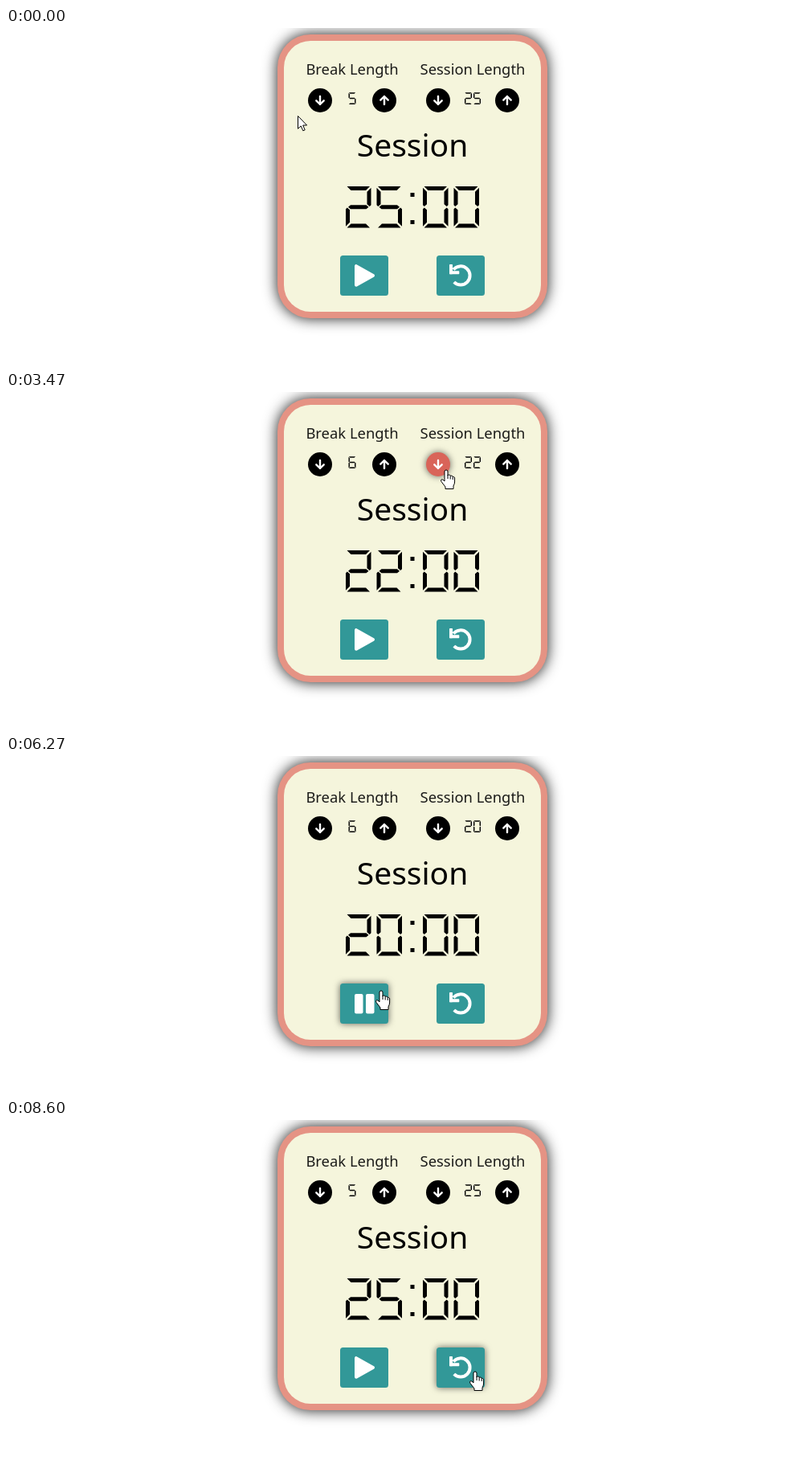
An HTML page for the animation above (9800 ms loop, 996x418 px).

```html
<!DOCTYPE html>
<html lang="en">
<head>
<meta charset="utf-8">
<title>Session timer</title>
<style>
html, body { margin: 0; width: 100%; height: 100%; overflow: hidden; background: #fff; }
svg { display: block; width: 996px; height: 418px; }
text { font-family: "Noto Sans", "Open Sans", sans-serif; text-anchor: middle; }
.label { font-size: 18.4px; fill: #1c1c1a; }
.title { font-size: 39px; }
.card { filter: drop-shadow(0 0 9px rgba(0,0,0,.9)); }
.round { fill: #000; }
.box { fill: #329898; }
.hover { filter: drop-shadow(0 0 4px rgba(0,0,0,.6)); }
.round.hover { fill: #d96459; }
.icon { fill: none; stroke: #fff; stroke-width: 2.4; stroke-linecap: round; stroke-linejoin: round; }
.cursor { fill: #fff; stroke: #000; stroke-linejoin: round; }
</style>
</head>
<body>
<svg viewBox="0 0 996 418">
  <rect class="card" x="338" y="8" width="336" height="353" rx="41" fill="#e59384"/>
  <rect x="346" y="16" width="320" height="337" rx="33" fill="#f5f5dc"/>
  <text class="label" x="431" y="58">Break Length</text>
  <text class="label" x="581" y="58">Session Length</text>
  <text class="title" x="506" y="160">Session</text>
  <g id="buttons"></g>
  <path id="breakLen"/>
  <path id="sessionLen"/>
  <path id="clock"/>
  <path id="play" d="M436 296.2V319.8L457 308Z" fill="#fff" stroke="#fff" stroke-width="4" stroke-linejoin="round"/>
  <g id="pause" fill="#fff">
    <rect x="434" y="296" width="10.5" height="24.5" rx="2"/>
    <rect x="448" y="296" width="10.5" height="24.5" rx="2"/>
  </g>
  <g fill="#fff">
    <rect x="552" y="294" width="4" height="12.3" rx=".7"/>
    <rect x="552" y="302.3" width="12.3" height="4" rx=".7"/>
    <path d="M557 300.6A11.6 11.6 0 1 1 557.8 316.2" fill="none" stroke="#fff" stroke-width="4"/>
  </g>
  <path id="arrow" class="cursor" d="M.5 .5V16.3L4.2 12.9L6.8 18.8L9.2 17.8L6.7 12H11.6Z"/>
  <path id="hand" class="cursor" d="M-2 2Q-2 0 0 0T2 2V7Q2 6 3.6 6T5.2 7.6Q5.4 7 6.8 7.1T8.2 8.8Q8.6 8.2 9.4 8.4Q10.6 8.8 10.6 10V15Q10.6 17 9 20V23.5H-1V21L-6 14.5Q-7 12.6 -5.8 11.8Q-4.4 11 -2 14ZM2 6.5V11M5.2 7.6V11.5M8.2 8.8V12"/>
</svg>
<script>
(() => {
const LOOP = 9800, STEP = 200 / 3;
const $ = id => document.getElementById(id);

// Steps at which something is pressed or ticks
const BREAK_DOWN = 9, BREAK_UP = [21, 26], SESSION_DOWN = [43, 49, 52, 57, 60];
const START = 80, TICKS = [95, 110, 125], RESET = 129;

// Pointer path: step, x, y
const KEYS = [
  [0, 363, 109], [3, 389, 97], [8, 389, 97], [16, 469, 101], [29, 469, 101],
  [35, 548, 97], [64, 548, 97], [65, 549, 97], [74, 452, 306], [75, 452, 306],
  [77, 448, 309], [87, 448, 309], [88, 449, 309], [92, 449, 309], [94, 467, 292],
  [96, 498, 277], [99, 498, 277], [104, 520, 270], [110, 556, 287],
  [114, 581, 311], [115, 581, 311], [117, 584, 313], [147, 584, 313]
];

const buttons = [];
function addButton(markup, hit) {
  const g = document.createElementNS("http://www.w3.org/2000/svg", "g");
  g.innerHTML = markup;
  $("buttons").append(g);
  buttons.push({ el: g.firstElementChild, hit });
}
function addRound(cx, dir) {
  const tip = 90 + 5 * dir;
  addButton(
    `<circle class="round" cx="${cx}" cy="90" r="15"/>
     <path class="icon" d="M${cx} ${90 - 5 * dir}V${tip}M${cx - 4.7} ${tip - 4.7 * dir}L${cx} ${tip}L${cx + 4.7} ${tip - 4.7 * dir}"/>`,
    (x, y) => Math.hypot(x - cx, y - 90) < 15);
}
function addBox(left) {
  addButton(
    `<rect class="box" x="${left}" y="283" width="60" height="50" rx="3.5"/>`,
    (x, y) => x >= left && x < left + 60 && y >= 283 && y < 333);
}
addRound(391, 1);
addRound(471, -1);
addRound(538, 1);
addRound(624, -1);
addBox(416);
addBox(536);

// Seven-segment numerals
const W = 31.5, H = 51.5, T = 5, MID = H / 2;
const flipX = pts => pts.map(([x, y]) => [W - x, y]);
const flipY = pts => pts.map(([x, y]) => [x, H - y]);
const bar = [[1.5, 0], [W - 1.5, 0], [W - T - 1.5, T], [T + 1.5, T]];
const side = [[0, 1.8], [T, T + 1.8], [T, MID - 3.6], [1.8, MID - .8], [0, MID - 2.5]];
const SEG = {
  a: bar,
  b: flipX(side),
  c: flipX(flipY(side)),
  d: flipY(bar),
  e: flipY(side),
  f: side,
  g: [[3, MID], [T + 1, MID - 2.6], [W - T - 1, MID - 2.6], [W - 3, MID],
      [W - T - 1, MID + 2.6], [T + 1, MID + 2.6]]
};
const NUMERALS = "abcdef bc abged abgcd fgbc afgcd afgedc abc abcdefg abcdfg".split(" ");
const advance = ch => ch === ":" ? 19 : ch === "1" ? 19.5 : 38.5;

function numerals(str, cx, y, k) {
  let x = -[...str].reduce((sum, ch) => sum + advance(ch), 0) / 2, d = "";
  const poly = (pts, dx) => {
    d += "M" + pts.map(p => `${(cx + (x + dx + p[0]) * k).toFixed(2)} ${(y + p[1] * k).toFixed(2)}`).join("L") + "Z";
  };
  for (const ch of str) {
    if (ch === ":") {
      for (const v of [8, 42]) poly([[0, v], [5, v], [5, v + 5], [0, v + 5]], 7);
    } else {
      for (const s of NUMERALS[ch]) poly(SEG[s], ch === "1" ? -19.2 : 3.5);
    }
    x += advance(ch);
  }
  return d;
}

// Smooth curve through the keys, with zero speed at rests
function slope(i, c) {
  const p = KEYS[i - 1], q = KEYS[i], r = KEYS[i + 1];
  const same = (a, b) => a[1] === b[1] && a[2] === b[2];
  if (!p || !r || same(p, q) || same(q, r)) return 0;
  return (r[c] - p[c]) / (r[0] - p[0]);
}
function pointer(n) {
  let i = 0;
  while (i < KEYS.length - 2 && n >= KEYS[i + 1][0]) i++;
  const a = KEYS[i], b = KEYS[i + 1], len = b[0] - a[0];
  const u = Math.min(1, (n - a[0]) / len), v = 1 - u;
  return [1, 2].map(c => Math.round(
    v * v * (1 + 2 * u) * a[c] + u * u * (3 - 2 * u) * b[c] +
    len * u * v * (v * slope(i, c) - u * slope(i + 1, c))));
}

const passed = (list, n) => list.filter(s => n >= s).length;
const pad = v => String(v).padStart(2, "0");
const show = (id, on) => $(id).setAttribute("visibility", on ? "visible" : "hidden");

function render(ms) {
  const n = Math.floor((ms % LOOP + 5) / STEP);
  const reset = n >= RESET;
  const breakLen = reset ? 5 : 5 - (n >= BREAK_DOWN) + passed(BREAK_UP, n);
  const session = reset ? 25 : 25 - passed(SESSION_DOWN, n);
  const left = session * 60 - (reset ? 0 : passed(TICKS, n));
  const running = n >= START && !reset;

  $("breakLen").setAttribute("d", numerals(String(breakLen), 431, 80.2, 2 / 7));
  $("sessionLen").setAttribute("d", numerals(String(session), 581, 80.2, 2 / 7));
  $("clock").setAttribute("d", numerals(pad(Math.floor(left / 60)) + ":" + pad(left % 60), 506, 197, 1));
  show("play", !running);
  show("pause", running);

  const [x, y] = pointer(n);
  let over = false;
  for (const b of buttons) {
    const on = b.hit(x, y);
    b.el.classList.toggle("hover", on);
    over = over || on;
  }
  show("hand", over);
  show("arrow", !over);
  $(over ? "hand" : "arrow").setAttribute("transform", `translate(${x} ${y})`);
}

const t0 = performance.now();
function loop() {
  render(performance.now() - t0);
  requestAnimationFrame(loop);
}
loop();
})();
</script>
</body>
</html>
```
